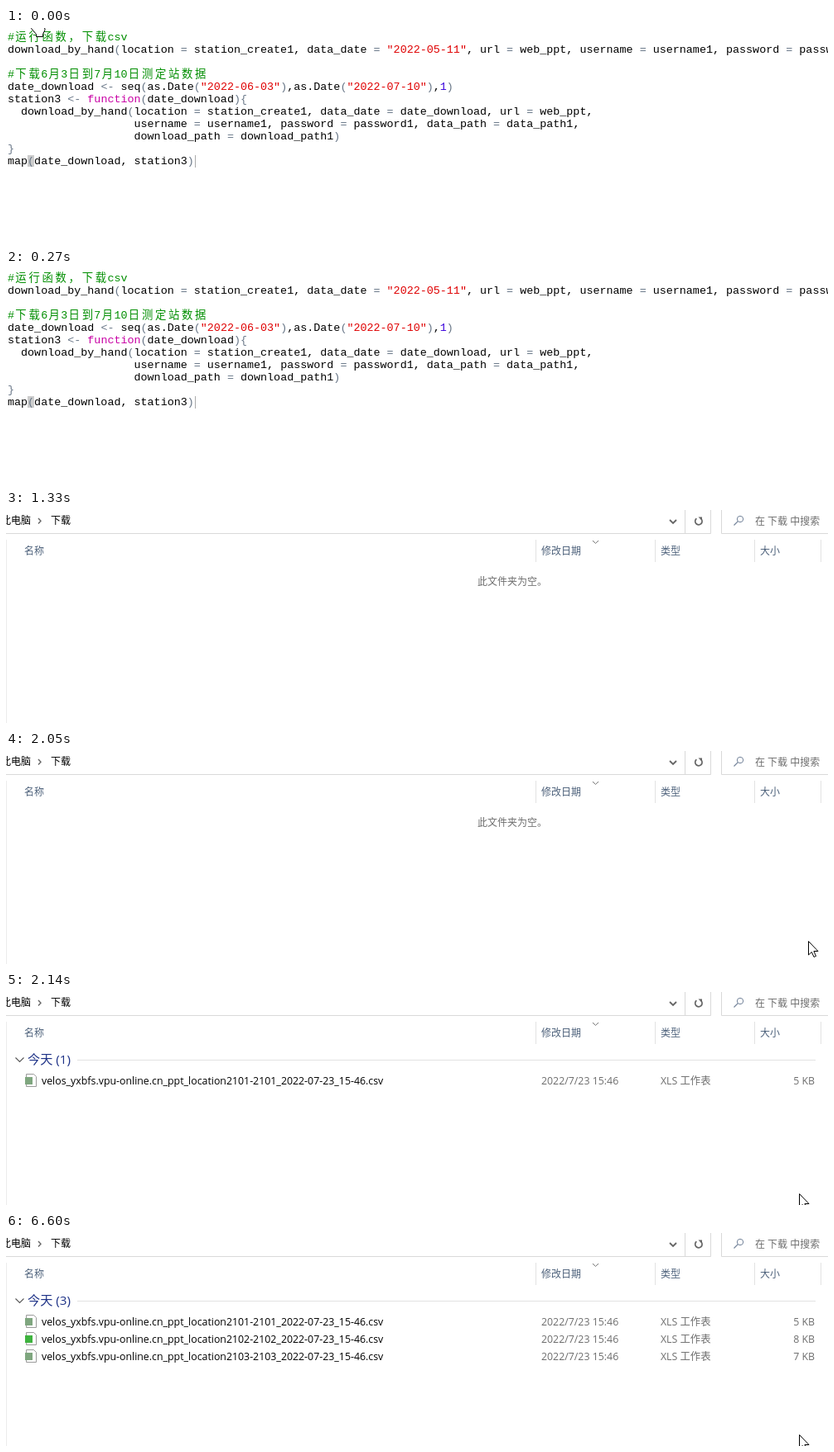
Write an HTML page that moves like this. It is 992 by 258 pixels and loops after 8000 ms.

```html
<!DOCTYPE html>
<html lang="zh-CN">
<head>
<meta charset="utf-8">
<title>Batch download</title>
<style>
html, body { margin: 0; width: 100%; height: 100%; overflow: hidden; background: #fff; }
svg { display: block; width: 992px; height: 258px; }
.code { font: 13.38px "Liberation Mono", "Noto Sans CJK SC", "Noto Sans CJK", monospace; }
.ui { font: 12px "Open Sans", "Noto Sans CJK SC", "Noto Sans CJK", sans-serif; }
.line { fill: none; }
.pointer { fill: #fff; stroke: #000; stroke-width: 1; }
</style>
</head>
<body>
<svg id="stage" viewBox="0 0 992 258"></svg>
<script>
const LOOP = 8000;
const CELL = 13.38 * 0.6;
const stage = document.getElementById("stage");

function el(parent, tag, attrs, text) {
  const node = document.createElementNS("http://www.w3.org/2000/svg", tag);
  for (const key in attrs) node.setAttribute(key, attrs[key]);
  if (text) node.textContent = text;
  return parent.appendChild(node);
}
const group = (cls, parent = stage) => el(parent, "g", { class: cls });
const label = (g, x, y, text, fill, more) => el(g, "text", { x, y, fill, ...more }, text);
const line = (g, d, stroke, width = 1) =>
  el(g, "path", { d, stroke, "stroke-width": width, class: "line" });
const rect = (g, x, y, width, height, fill) => el(g, "rect", { x, y, width, height, fill });

// Editor
const source = [
  '#运行函数，下载csv',
  'download_by_hand(location = station_create1, data_date = "2022-05-11", url = web_ppt, username = username1, password = password1',
  '',
  '#下载6月3日到7月10日测定站数据',
  'date_download <- seq(as.Date("2022-06-03"),as.Date("2022-07-10"),1)',
  'station3 <- function(date_download){',
  '  download_by_hand(location = station_create1, data_date = date_download, url = web_ppt,',
  '                   username = username1, password = password1, data_path = data_path1,',
  '                   download_path = download_path1)',
  '}',
  'map(date_download, station3)'
];
const syntax = /(#.*)|("[^"]*")|(\bfunction\b)|(\b\d+\b)|(<-|[=(){}])|[\w.]+|,/g;
const colors = ["#008e00", "#df0002", "#c800a4", "#3a00dc", "#687687"];

// Wide characters sit in the middle of two cells.
function codeText(g, col, y, text, fill) {
  for (const part of text.match(/[\x20-\x7e]+|./g)) {
    const wide = part.charCodeAt(0) > 126;
    label(g, 2 + (col + wide) * CELL, y, part, fill, wide ? { "text-anchor": "middle" } : {});
    col += wide ? 2 : part.length;
  }
}

const editor = group("code");
rect(editor, 26, 154, 8, 14, "#cccccc");
source.forEach((text, row) => {
  for (const m of text.matchAll(syntax)) {
    const kind = m.slice(1).findIndex(Boolean);
    codeText(editor, m.index, 15 * (row + 1), m[0], colors[kind] || "#000");
  }
});
rect(editor, 228, 154, 1, 15, "#aaaaaa");

// File window
const files = group("ui");
line(files, "M0 28.5H850.5V0M819.5 0V28M863.5 0V28.5H992", "#d9d9d9");
line(files, "M.5 36V258", "#ececec");
line(files, "M639.5 36V63M783.5 36V63M903.5 36V63M983.5 36V63", "#e2e2e2");
label(files, -6, 17, "此电脑", "#000");
label(files, 54, 17, "下载", "#000");
line(files, "M39 10L42 13.2L39 16.4", "#666", 1.4);
line(files, "M801 12L805 16L809 12", "#666", 1.8);
line(files, "M838.6 10.4A4.2 4.2 0 1 1 833.4 10.2", "#666", 1.7);
el(files, "path", { d: "M835.5 8.5H840V13Z", fill: "#666" });
el(files, "circle", { cx: 886, cy: 11, r: 3.7, stroke: "#73839a", class: "line" });
line(files, "M883.3 13.7L878.5 18.5", "#73839a", 1.2);
label(files, 904, 18, "在 下载 中搜索", "#6d6d6d");
[[22, "名称"], [646, "修改日期"], [790, "类型"], [910, "大小"]]
  .forEach(([x, text]) => label(files, x, 54, text, "#4c607a"));
line(files, "M708 37L711.5 40.5L715 37", "#777");
const empty = label(files, 569, 91, "此文件夹为空。", "#6d6d6d");

const list = group("", files);
line(list, "M11.5 79.5L16.5 84.5L21.5 79.5", "#555", 1.1);
const title = label(list, 26, 87, "", "#1e3287", { "font-size": 15.2 });
line(list, "M86 82.5H977", "#e2e2e2");

function fileRow(i, size, tint) {
  const g = group("", list);
  const y = 112 + 21 * i;
  const cell = (x, text, fill, more) => label(g, x, y, text, fill, { "font-size": 12.35, ...more });
  el(g, "path", {
    d: `M24.5 ${y - 12.5}H33.5L36.5 ${y - 9.5}V${y + 2.5}H24.5Z`, fill: "#fff", stroke: "#9a9a9a"
  });
  rect(g, 23, y - 9, 9, 9, tint);
  const id = 2101 + i;
  cell(43, `velos_yxbfs.vpu-online.cn_ppt_location${id}-${id}_2022-07-23_15-46.csv`, "#000");
  cell(646, "2022/7/23 15:46", "#6d6d6d");
  cell(790, "XLS 工作表", "#6d6d6d");
  cell(976, size + " KB", "#6d6d6d", { "text-anchor": "end" });
  return g;
}
const rows = [fileRow(0, 5, "#7fa67f"), fileRow(1, 8, "#3fb33f"), fileRow(2, 7, "#7fa67f")];
const arrivals = [2140, 4280, 6600];

// Pointers, each drawn from its hot spot
const shapes = {
  hand: "M-1.5 0Q0 -2 1.5 0V7L9 9Q12 10 11.5 14L9 19V22H1V19L-5 12Q-6 9 -3.5 9.5L-1.5 11Z",
  resize: "M0 0L5 -4.5V-2H12V2H5V4.5Z",
  arrow: "M0 0V16.5L3.8 13L6.5 19L9 18L6.4 12H11.5Z"
};
const pointers = {};
for (const name in shapes) pointers[name] = el(stage, "path", { d: shapes[name], class: "pointer" });

const path = [
  [0, "hand", 35.5, -11.5],
  [90, "hand", 394, -10],
  [180, "hand", 751, -9],
  [270],
  [1960, "resize", 985.5, 208.5],
  [2050, "arrow", 968.5, 230.5],
  [2140, "arrow", 957.5, 244.5]
];

const show = (node, on) => node.setAttribute("display", on ? "inline" : "none");

function draw(t) {
  const count = arrivals.filter(at => t >= at).length;
  show(editor, t < 1330);
  show(files, t >= 1330);
  show(empty, count === 0);
  show(list, count > 0);
  rows.forEach((row, i) => show(row, i < count));
  title.textContent = `今天 (${count})`;

  const [, kind, x, y] = path.filter(step => t >= step[0]).pop();
  for (const name in pointers) show(pointers[name], name === kind);
  if (kind) pointers[kind].setAttribute("transform", `translate(${x} ${y})`);
}

const start = performance.now();
function tick() {
  draw((performance.now() - start) % LOOP);
  requestAnimationFrame(tick);
}
draw(0);
requestAnimationFrame(tick);
</script>
</body>
</html>
```
